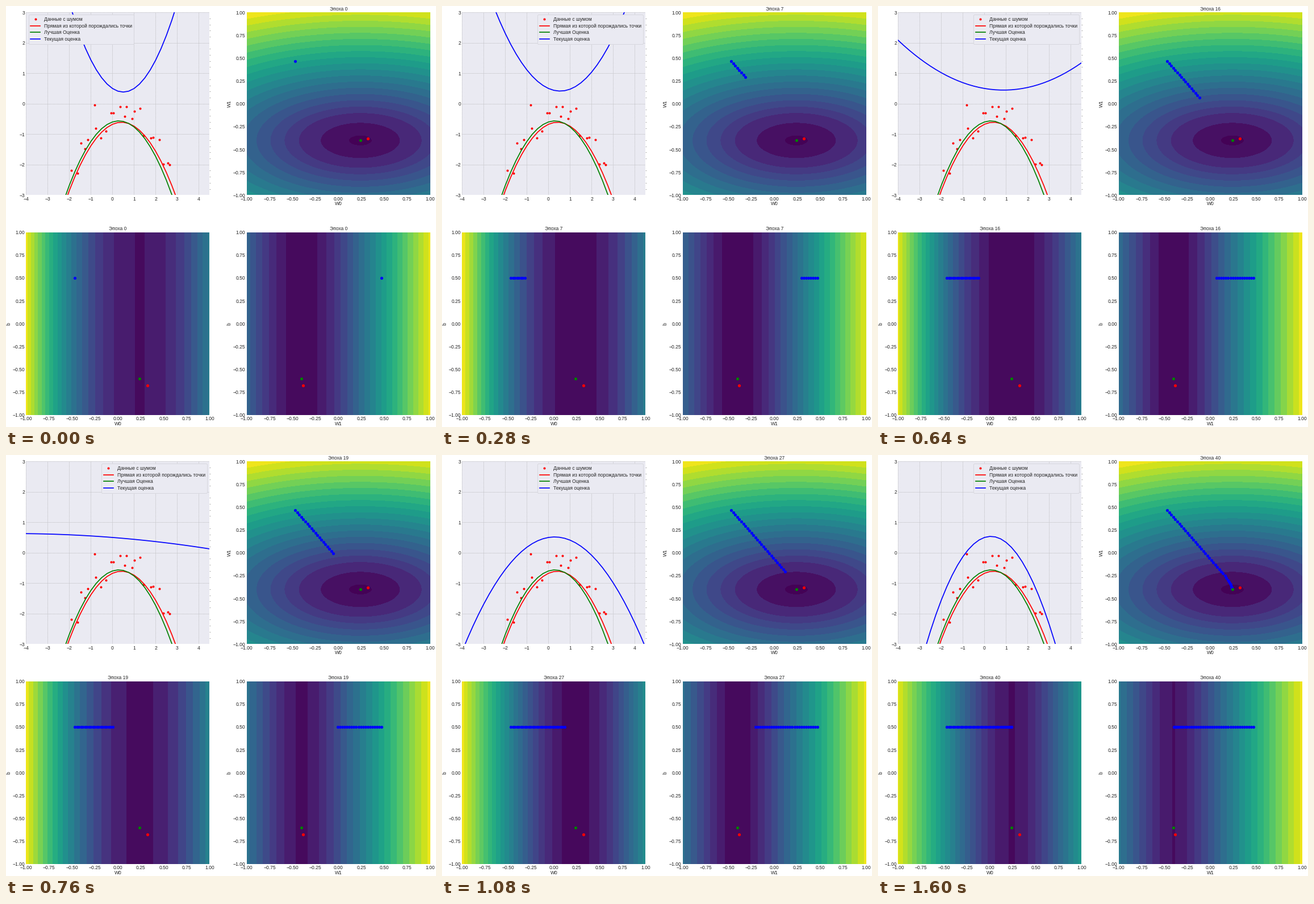
A matplotlib script for the animation above (1.64 s loop, 757x740 px).

```python
import numpy as np
import matplotlib.pyplot as plt
from matplotlib.animation import FuncAnimation

W, H, DPI = 757, 740, 64
PX = 72 / DPI  # points per pixel
EPOCHS = 41
FONT = 8.5 * PX
SIDE = (323, 321.2)  # panel size in pixels
LEFT, RIGHT, TOP, BOTTOM = 35.4, 423.8, 11.1, 397.6

plt.rcParams.update({
    "font.family": "Liberation Sans",
    "font.size": FONT,
    "text.color": "#262626",
    "xtick.color": "#262626",
    "ytick.color": "#262626",
})

# Weights (w0, w1, b) of the parabola w1*x^2 + w0*x + b
TRUE = (0.323, -0.383, -0.677)
BEST = (0.238, -0.402, -0.6)
START = (-0.47, 0.467, 0.5)


def parabola(x, w0, w1, b):
    return w1 * x ** 2 + w0 * x + b


def loss(w0, w1):
    return np.sqrt(0.354 + (2.05 * (w0 - BEST[0])) ** 2
                   + (4.55 * (w1 - BEST[1])) ** 2)


def descend(start, end, speed):
    """Constant steps that settle smoothly at the end value."""
    way = speed * np.arange(EPOCHS)
    total = abs(end - start)
    way = way / (1 + (way / total) ** 16) ** (1 / 16)
    return start + np.sign(end - start) * way


path0 = descend(START[0], BEST[0], 0.0218)
path1 = descend(START[1], BEST[1], 0.0249)

rng = np.random.RandomState(4)
data_x = np.linspace(-2.1, 2.7, 25) + rng.uniform(-0.08, 0.08, 25)
data_y = parabola(data_x, *TRUE) + rng.triangular(-0.55, 0.1, 1.6, 25)
curve_x = np.linspace(-4, 4.5, 35)

fig = plt.figure(figsize=(W / DPI, H / DPI), dpi=DPI, facecolor="white")


def add_axes(left, top, xlim, ylim, xticks, yticks):
    ax = fig.add_axes([left / W, 1 - (top + SIDE[1]) / H,
                       SIDE[0] / W, SIDE[1] / H])
    ax.set(xlim=xlim, ylim=ylim, xticks=xticks, yticks=yticks)
    ax.tick_params(length=0, pad=2.4 * PX, labelsize=FONT)
    for spine in ax.spines.values():
        spine.set_visible(False)
    return ax


def label(x, y, text, rotation=0):
    return fig.text(x / W, 1 - y / H, text, ha="center", va="center",
                    rotation=rotation)


def add_plane(left, top, xname, yname):
    ticks = np.linspace(-1, 1, 9)
    ax = add_axes(left, top, (-1, 1), (-1, 1), ticks, ticks)
    middle = left + SIDE[0] / 2
    label(middle, top + 336.5, xname)
    label(left - 30.5, top + SIDE[1] / 2, yname, 90)
    return ax, label(middle, top - 5.8, "")


def add_dots(ax, x, y, color, zorder=5):
    return ax.plot(x, y, "o", color=color, ms=5.2 * PX, mew=0,
                   zorder=zorder)[0]


def add_curve(color, name, weights):
    return fit.plot(curve_x, parabola(curve_x, *weights), color=color,
                    lw=1.7 * PX, label=name)[0]


# Data and fitted curves
fit = add_axes(LEFT, TOP, (-4, 4.5), (-3, 3), range(-4, 5), range(-3, 4))
fit.set_facecolor("#EAEAF2")
fit.set_axisbelow(True)
fit.grid(color="#c2c2c6", lw=0.8 * PX, ls=(0, (1.5, 0.7)))
fit.set_yticks(np.arange(-3, 3.01, 0.2), minor=True)
fit.tick_params(axis="y", which="minor", left=False, right=True,
                length=2 * PX, width=0.6 * PX, color="#777777")
fit.plot(data_x, data_y, "o", color="red", ms=4 * PX, mew=0,
         label="Данные с шумом")
add_curve("red", "Прямая из которой порождались точки", TRUE)
add_curve("green", "Лучшая Оценка", BEST)
current = add_curve("blue", "Текущая оценка", START)
legend = fit.legend(loc="upper right", fontsize=FONT, labelspacing=0.33,
                    framealpha=1, facecolor="#EAEAF2", edgecolor="#d3d3da")
legend.get_frame().set_linewidth(0.8 * PX)

# Loss surfaces
plane, title_a = add_plane(RIGHT, TOP, "W0", "W1")
strip0, title_b = add_plane(LEFT, BOTTOM, "W0", "b")
strip1, title_c = add_plane(RIGHT, BOTTOM, "W1", "b")
titles = (title_a, title_b, title_c)

grid = np.linspace(-1, 1, 161)
gx, gy = np.meshgrid(grid, grid)
plane.contourf(gx, gy, loss(gx, gy), cmap="viridis",
               levels=[0.59, 0.65, 1.07, *np.arange(1.5, 7.1, 0.3)])

trails = []
for ax, i, j in ((plane, 0, 1), (strip0, 0, 2), (strip1, 1, 2)):
    trails.append(add_dots(ax, [], [], "blue", 4))
    add_dots(ax, TRUE[i], TRUE[j], "red")
    add_dots(ax, BEST[i], BEST[j], "green", 6)

strips = []


def draw_strip(ax, values):
    strips.append(ax.contourf(grid, [-1, 1], np.vstack([values, values]),
                              levels=20, cmap="viridis", zorder=1))


def legend_place(epoch):
    """Corner that the current curve leaves free."""
    if epoch < 1:
        return "upper left"
    return "upper center" if 11 <= epoch < 15 else "upper right"


def draw(epoch):
    w0, w1 = path0[epoch], path1[epoch]
    current.set_ydata(parabola(curve_x, w0, w1, START[2]))
    legend.set_loc(legend_place(epoch))

    while strips:
        strips.pop().remove()
    draw_strip(strip0, loss(grid, w1))
    draw_strip(strip1, loss(w0, grid))

    past0, past1 = path0[:epoch + 1], path1[:epoch + 1]
    level = np.full(epoch + 1, START[2])
    for trail, x, y in zip(trails, (past0, past0, past1),
                           (past1, level, level)):
        trail.set_data(x, y)
    for title in titles:
        title.set_text(f"Эпоха {epoch}")
    return []


anim = FuncAnimation(fig, draw, frames=EPOCHS, interval=40,
                     repeat=True, repeat_delay=0)
plt.show()
```
